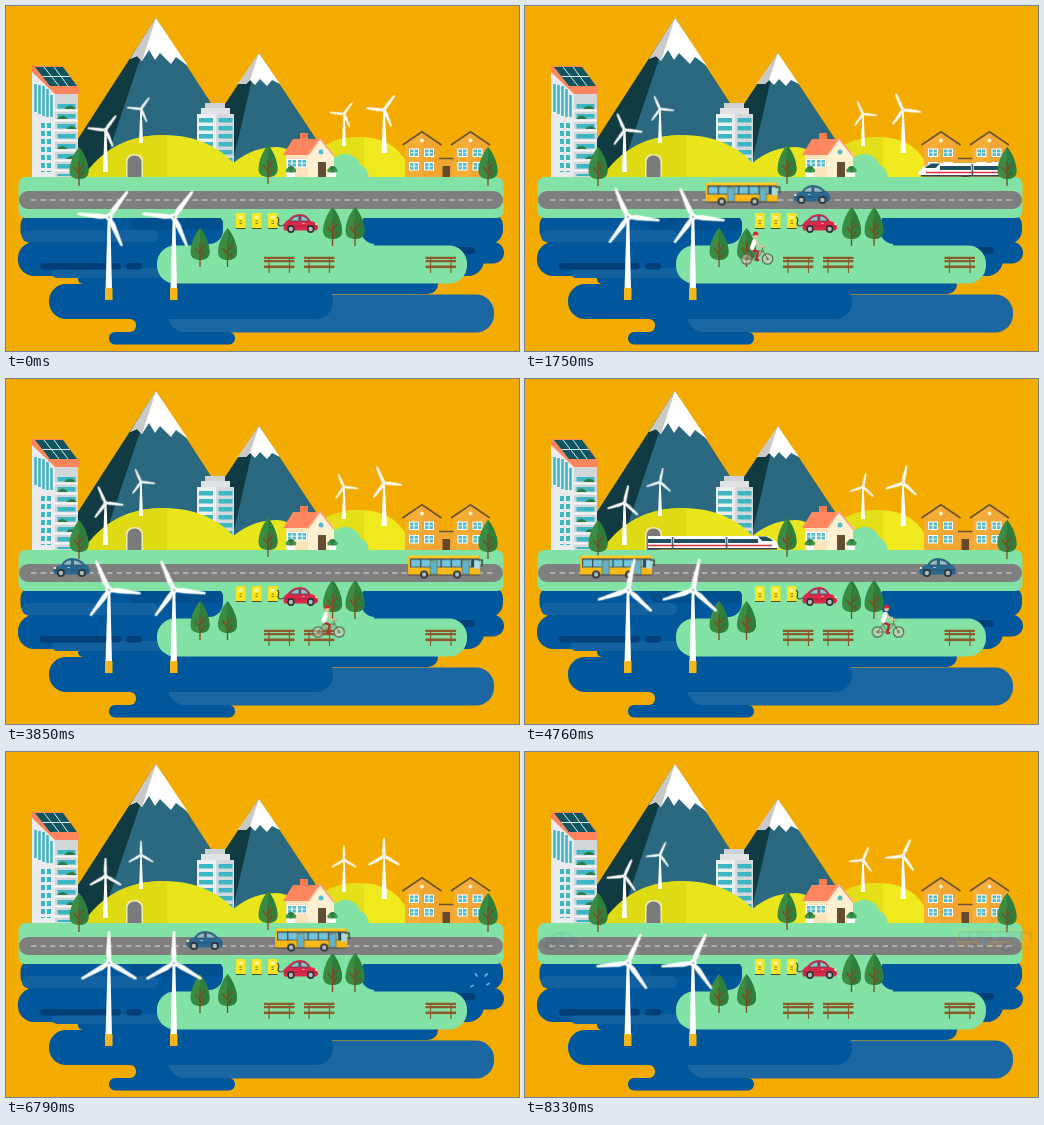
An HTML page without scripts for the animation above (8400 ms loop, 513 px wide and 345 px high).

```html
<!DOCTYPE html>
<html lang="en">
<head>
<meta charset="utf-8">
<title>Green town</title>
<style>
html, body { margin: 0; width: 100%; height: 100%; overflow: hidden; background: #f3ab00; }
svg { display: block; width: 100%; height: 100%; }
.spin { animation: spin 2.1s steps(30) infinite; }
.bus { animation: bus 4.2s steps(60) infinite, fade 4.2s linear infinite; }
.car { animation: car 4.2s steps(60) infinite, fade 4.2s linear infinite; }
.train { animation: train 4.2s steps(60) infinite; }
.rider { animation: ride 8.4s linear infinite; }
.splash { animation: splash 8.4s linear infinite; }
@keyframes spin { from { transform: rotate(36deg); } to { transform: rotate(396deg); } }
@keyframes bus { from { transform: translate(-4px, 175.5px); } to { transform: translate(439px, 175.5px); } }
@keyframes car { from { transform: translate(453px, 179px); } to { transform: translate(10px, 179px); } }
@keyframes train { from { transform: translate(-48px, 156px); } to { transform: translate(1010px, 156px); } }
@keyframes fade { 0%, 98.8%, 100% { opacity: 0; } 4%, 95% { opacity: 1; } }
@keyframes ride {
  0% { transform: translate(158px, 264px) rotate(-12deg); opacity: 0; }
  3% { transform: translate(168px, 261px) rotate(-14deg); opacity: 1; }
  9% { transform: translate(190px, 253px) rotate(-4deg); }
  12% { transform: translate(200px, 253px) rotate(0deg); }
  20.83% { transform: translate(232px, 253px) rotate(0deg); }
  34.17% { transform: translate(279px, 253px) rotate(0deg); }
  56.67% { transform: translate(363px, 253px) rotate(0deg); }
  70.8% { transform: translate(416px, 253px) rotate(0deg); }
  73.33% { transform: translate(428px, 252px) rotate(-27deg); }
  76.67% { transform: translate(449px, 238px) rotate(-12deg); }
  78.5% { transform: translate(462px, 236px) rotate(25deg); opacity: 1; }
  80%, 100% { transform: translate(473px, 243px) rotate(70deg); opacity: 0; }
}
@keyframes splash {
  0%, 79.4% { transform: scale(.3); opacity: 0; }
  80% { transform: scale(.6); opacity: 1; }
  80.83% { transform: scale(1); opacity: 1; }
  85% { transform: scale(1.8); opacity: 1; }
  89%, 100% { transform: scale(2.4); opacity: 0; }
}
</style>
</head>
<body>
<svg viewBox="0 0 513 345" preserveAspectRatio="none">
<defs>
  <path id="blade" d="M-1.2-1L-2.6-9L-1-31Q0-32.5 1-31L2-9L1.4-1Z"/>
  <g id="blades" fill="#fff">
    <use href="#blade"/>
    <use href="#blade" transform="rotate(120)"/>
    <use href="#blade" transform="rotate(240)"/>
    <circle r="3.2"/><circle r="1.4" fill="#b9c6cf" stroke="none"/>
  </g>
  <g id="tree">
    <path d="M0-20C6-13 9.5-3 9.5 4C9.5 10 5 12 0 12C-5 12-9.5 10-9.5 4C-9.5-3-6-13 0-20Z" fill="#3a8c42"/>
    <path d="M0-20C6-13 9.5-3 9.5 4C9.5 10 5 12 0 12Z" fill="#2f7f3c"/>
    <path d="M0-6V19M0 6L-5 0M0 3L5-3M0 10L5 5" fill="none" stroke="#7d4a25" stroke-width="1.3"/>
  </g>
  <g id="bench" stroke="#8b5a2b">
    <path d="M5 1V17M25.5 1V17" stroke-width="1.2"/>
    <path d="M0 1.8H30.5M0 5.2H30.5" stroke-width="2.2"/>
    <path d="M0 10.8H30.5" stroke-width="2.6"/>
  </g>
  <g id="wheel">
    <circle r="4" fill="#2d3438"/><circle r="2.2" fill="#b5bdc1"/>
  </g>
  <g id="auto">
    <path d="M1 14Q1 8 6 6Q11 0 19 0Q26 0 30 7Q37 8 38 14L36 16.5H2Z" fill="currentColor"/>
    <path d="M8 7Q12 2 17.5 1.8V7ZM19.5 1.8Q25 2 28 7H19.5Z" fill="#94bfc9" stroke="#33434c" stroke-width=".7"/>
    <path d="M2 12H37" stroke="#0003"/>
    <path d="M21 9.5H23.5" stroke="#fff9"/>
    <path d="M35 10H37" stroke="#ffe9a0" stroke-width="2"/>
    <use href="#wheel" x="9" y="15"/><use href="#wheel" x="30" y="15"/>
  </g>
  <g id="charger">
    <rect width="9.5" height="16" rx="1" fill="#fbe51d"/>
    <rect x="2.5" y="2.5" width="4.5" height="3" fill="#fff7a0"/>
    <path d="M3.5 8H6M3.5 10.5H6" stroke="#8a7d2c" stroke-width="1.2"/>
    <path d="M0 15.5H9.5" stroke="#4a4632"/>
  </g>
  <g id="pane">
    <rect width="10" height="8.5" fill="#fff"/>
    <path d="M1 1H4.5V7.5H1ZM5.5 1H9V7.5H5.5Z" fill="#55bcc9"/>
    <path d="M0 4.2H10" stroke="#fff" stroke-width=".7"/>
  </g>
  <g id="home">
    <path d="M0 13L17 1L34 13V46H0Z" fill="#f5ad38"/>
    <path d="M17 1L34 13V46H17Z" fill="#f1a633"/>
    <path d="M-2.5 13.5L17 .3L36.5 13.5" fill="none" stroke="#6b5331" stroke-width="1.6"/>
    <circle cx="17" cy="9" r="2" fill="#fff3cf"/>
    <use href="#pane" x="4" y="17"/><use href="#pane" x="19" y="17"/>
    <use href="#pane" x="4" y="30.5"/><use href="#pane" x="19" y="30.5"/>
  </g>
  <g id="pot">
    <circle cy="-4" r="3.6" fill="#2c7b43"/><circle cx="-3" cy="-3" r="2.2" fill="#3f9848"/><circle cx="3" cy="-3" r="2.2" fill="#3f9848"/>
    <path d="M-4-1H4L3 5H-3Z" fill="#fff"/>
  </g>
  <g id="tyre" fill="none">
    <circle r="5.2" fill="#fff6" stroke="#5c6450" stroke-width="1.3"/>
    <path class="spin" d="M-5 0H5M0-5V5M-3.5-3.5L3.5 3.5M-3.5 3.5L3.5-3.5" stroke="#8d8370" stroke-width=".5"/>
    <circle r="1" fill="#a94b3d"/>
  </g>
  <clipPath id="rail"><rect x="123" y="140" width="355" height="40"/></clipPath>
</defs>

<rect width="513" height="345" fill="#f3ab00"/>

<g id="mountains">
  <path d="M150 12L245 159V172H50Z" fill="#2a697f"/>
  <path d="M150 12L50 167V172H94L135 50Z" fill="#113b42"/>
  <path d="M150 12L182 60L170 51L165 58L154 47L149 54L143 44L136 55L131 50L124 53Z" fill="#fff"/>
  <path d="M150 12L136 55L131 50L124 53Z" fill="#c9c9c9"/>
  <path d="M253 47L336 172H170Z" fill="#2a697f"/>
  <path d="M253 47L190 142V160H226L246 73Z" fill="#113b42"/>
  <path d="M253 47L274 78L266 74L261 80L254 73L249 79L244 74L240 78L232 78Z" fill="#fff"/>
  <path d="M253 47L244 74L240 78L232 78Z" fill="#c9c9c9"/>
</g>

<g id="office">
  <path d="M199 97H219V103H199Z" fill="#cfd2d4"/>
  <path d="M195 102H224V109H195Z" fill="#e0e2e4"/>
  <path d="M191 108H228V172H191Z" fill="#eceeef"/>
  <path d="M210 108H228V172H210Z" fill="#d4d8da"/>
  <path d="M200 112V170M219.5 112V170" stroke="#3db5c3" stroke-width="14" stroke-dasharray="4.5 3.5"/>
</g>

<g id="hills">
  <path d="M212 173C228 153 246 141 271 141C286 142 297 151 304 173Z" fill="#e9e51d"/>
  <path d="M76 173C95 143 123 129 157 129C194 129 222 144 240 173Z" fill="#e9e51d"/>
  <path d="M76 173C95 143 123 129 157 129H161V173Z" fill="#dedb14"/>
  <path d="M290 173C303 147 322 131 352 131C376 131 391 139 401 157V173Z" fill="#efe91e"/>
  <path d="M290 173C303 147 322 131 352 131H358V173Z" fill="#e3df18"/>
  <path d="M120 172V156Q120 148 128.5 148Q137 148 137 156V172Z" fill="#efecb4"/>
  <path d="M121.5 172V157Q121.5 149.5 128.5 149.5Q135.5 149.5 135.5 157V172Z" fill="#7a7a7a"/>
  <path d="M314 172V158Q320 148 330 151Q338 145 347 150Q354 154 354 159Q362 161 363 172Z" fill="#82e2a6"/>
</g>

<g id="masts" fill="#fff" stroke="#fff" stroke-width="0">
  <path d="M98.5 124H100.5L102 166H97Z"/><path d="M134.3 103H135.7L137 137H133Z"/>
  <path d="M337.3 108H338.7L340 140H336Z"/><path d="M377.3 104H378.7L381 147H375.5Z"/>
  <g stroke-width="1.3">
    <g transform="translate(99.5 124) scale(.56)"><use href="#blades" class="spin"/></g>
    <g transform="translate(135 103) scale(.44)"><use href="#blades" class="spin"/></g>
    <g transform="translate(338 108) scale(.44)"><use href="#blades" class="spin"/></g>
    <g transform="translate(378 104) scale(.56)"><use href="#blades" class="spin"/></g>
  </g>
</g>

<g id="tower">
  <path d="M26 65L50 87V172H26Z" fill="#e9ebec"/>
  <path d="M49 87H72V172H49Z" fill="#d3d6d8"/>
  <path d="M26 60H57L73 82V88H49L26 66Z" fill="#ff855c"/>
  <path d="M29 61H57L71 80H44Z" fill="#0f5560"/>
  <path d="M38 61L53 80M48 61L62 80M36.5 70.5H64" stroke="#dfeaec"/>
  <path d="M29.5 78V106M33.5 79V108M37.5 80V110M41.5 83V111M45.5 89V111" stroke="#3db5c3" stroke-width="2.5"/>
  <path d="M37 117V166M43 117V166" stroke="#3db5c3" stroke-width="4" stroke-dasharray="5 3"/>
  <path d="M60.5 98V170" stroke="#3db5c3" stroke-width="18" stroke-dasharray="4.5 5.5"/>
  <path d="M49 104.5H72M49 114.5H72M49 124.5H72M49 134.5H72M49 144.5H72M49 154.5H72M49 164.5H72" stroke="#f8f8f8" stroke-width="2"/>
  <path d="M58 103Q64 96 70 103ZM51 113Q57 106 62 113ZM60 123Q66 117 71 123ZM51 143Q56 137 62 143ZM60 153Q65 147 70 153Z" fill="#2c7b43"/>
</g>

<g id="cottage">
  <path d="M280 147H328V172H280Z" fill="#fde3b9"/>
  <path d="M302 149L314 132L328 149V172H302Z" fill="#fff0d2"/>
  <path d="M294 127H302V138H294Z" fill="#f97b52"/>
  <path d="M287 133H314L303 149H277Z" fill="#ff875f"/>
  <path d="M302 149L314 132.5L328 150" fill="none" stroke="#fba27f" stroke-width="1.6"/>
  <use href="#pane" x="281" y="153"/><use href="#pane" x="291" y="153"/>
  <circle cx="315" cy="146" r="2.5" fill="#55bcc9"/>
  <path d="M312 156H320V172H312Z" fill="#644c35"/>
  <use href="#pot" x="285" y="167.5"/><use href="#pot" x="326.5" y="167.5"/>
</g>

<g id="terrace">
  <path d="M432 153H448V172H432Z" fill="#f1a633"/>
  <path d="M432 152.5H448" stroke="#6b5331" stroke-width="1.5"/>
  <path d="M436.5 160H444V172H436.5Z" fill="#65492a"/>
  <use href="#home" x="399" y="125.5"/><use href="#home" x="447.5" y="125.5"/>
</g>

<g id="water" fill="#00579b">
  <rect x="12" y="236" width="466" height="34" rx="16"/>
  <rect x="400" y="236" width="98" height="21.5" rx="10.7"/>
  <rect x="72" y="266" width="300" height="12" rx="5"/>
  <rect x="200" y="262" width="232" height="26" rx="10"/>
  <path d="M118 305H185V330H118Z"/>
  <rect x="162" y="288.5" width="326" height="38" rx="18" fill="#1b67a3"/>
  <rect x="80" y="313" width="50" height="13" rx="6" fill="#f3ab00"/>
  <rect x="43" y="278" width="284" height="35" rx="17"/>
  <rect x="103" y="326" width="126" height="12.5" rx="6"/>
  <rect x="46" y="262" width="130" height="10" rx="5" fill="#1261a0"/>
  <rect x="34" y="257" width="81" height="6.5" rx="3.2" fill="#003f78"/>
  <rect x="120" y="257" width="16" height="6.5" rx="3.2" fill="#003f78"/>
  <rect x="440" y="241" width="29" height="7" rx="3.5" fill="#003f78"/>
  <path d="M200 205H368V246H200Z" fill="#82e2a6"/>
  <rect x="14.5" y="206" width="202.5" height="32" rx="14"/>
  <rect x="355" y="206" width="142" height="32" rx="14"/>
  <rect x="16" y="224" width="136" height="12" rx="6" fill="#1261a0"/>
  <rect x="125" y="211" width="92" height="13" rx="6" fill="#00508f"/>
</g>
<g id="ground" fill="#82e2a6">
  <rect x="151" y="239.5" width="310" height="38" rx="18"/>
  <rect x="12.5" y="171" width="485" height="41" rx="7"/>
  <rect x="13" y="185" width="484" height="18" rx="9" fill="#7f7f7f"/>
  <path d="M25 194H489" stroke="#dedede" stroke-width="1.2" stroke-dasharray="5.5 4"/>
</g>

<g clip-path="url(#rail)">
  <g class="train">
    <path d="M0 11Q5 4 14 1H148Q157 4 162 11L159 14H3Z" fill="#fff"/>
    <path d="M9 4L14 1.5H22L18 6H7ZM153 4L148 1.5H140L144 6H155Z" fill="#1f4f60"/>
    <path d="M22 6H53M56 6H107M110 6H140" stroke="#1f4f60" stroke-width="4"/>
    <path d="M8 10.5H154" stroke="#d93139" stroke-width="1.4"/>
    <path d="M3 13.8H159" stroke="#35414a" stroke-width="1.4"/>
    <path d="M54.5 2V14M108.5 2V14" stroke="#4b5861" stroke-width="1.6"/>
  </g>
</g>

<use href="#tree" x="73" y="161"/><use href="#tree" x="262" y="159"/><use href="#tree" x="482" y="161"/>

<g class="car" color="#2a6a92"><use href="#auto" transform="translate(38) scale(-1 1)"/></g>
<g class="bus">
  <rect y="1" width="72" height="20" rx="2.5" fill="#f9b916"/>
  <path d="M2 2H70" stroke="#ffd029" stroke-width="2"/>
  <path d="M2 4H71V13H2Z" fill="#34444e"/>
  <path d="M3 8.8H64" stroke="#73c5dc" stroke-width="7" stroke-dasharray="9 1.2"/>
  <path d="M66 5.5H71.5V14H66Z" fill="#a5dce8"/>
  <path d="M22 6H29V20H22ZM54 6H61V20H54Z" fill="#5fb3cc" stroke="#8a6a18" stroke-width=".7"/>
  <path d="M0 20.5H72" stroke="#4c4940"/>
  <path d="M70 5.5H74V12" fill="none" stroke="#39424a" stroke-width="1.4"/>
  <g transform="translate(16 20)"><use href="#wheel"/></g>
  <g transform="translate(49 20)"><use href="#wheel"/></g>
</g>

<use href="#charger" x="230" y="207"/><use href="#charger" x="246" y="207"/><use href="#charger" x="262" y="207"/>
<path d="M271 211Q274 212 272 218Q274 222 279 218" fill="none" stroke="#3f4642" stroke-width="1.2"/>
<g transform="translate(276.500 208) scale(.94 1)" color="#d9284a"><use href="#auto"/></g>

<use href="#tree" x="326.500" y="221"/><use href="#tree" x="349" y="221"/>
<use href="#tree" x="194" y="242"/><use href="#tree" x="221.500" y="242"/>
<use href="#bench" x="258" y="250"/><use href="#bench" x="298" y="250"/><use href="#bench" x="419.500" y="250"/>

<g class="rider" fill="none" stroke-linecap="round" stroke-linejoin="round">
  <use href="#tyre" transform="translate(-10.500 0)"/>
  <use href="#tyre" transform="translate(10.500 0)"/>
  <path d="M-10.500 0L-5-8H6L10.500 0M6-8L-1 0L-5-8M-10.500 0H-1M6-8L5-12H8" stroke="#7a6a4c"/>
  <path d="M-5-10L1-7L-1 1H1" stroke="#b52b35" stroke-width="2.500"/>
  <path d="M-5-11L-2.500-18" stroke="#fff" stroke-width="4.500"/>
  <path d="M-1-18L2-13L7-12" stroke="#f2bd95" stroke-width="1.500"/>
  <circle cx="-1.500" cy="-23" r="2.400" fill="#f2bd95"/>
  <path d="M-4.500-23.500Q-4-27.500-1-27.500Q1.500-27 1.500-24Z" fill="#cf2b35"/>
</g>

<g transform="translate(474 238)">
  <path class="splash" d="M-9-3.500L-7-4.500M-4.500-16L-3-14M5-14L7-16M7-5.500L9-6.500" fill="none" stroke="#55bddd" stroke-width="1.800" stroke-linecap="round"/>
</g>

<g id="offshore" fill="#fff">
  <path d="M101.700 211H104.300L106 284H99.500Z"/><path d="M166.700 211H169.300L171 284H164.500Z"/>
  <path d="M99 282H106.500V294H99ZM164 282H171.500V294H164Z" fill="#f6b61a"/>
  <g stroke="#fff" stroke-width=".6">
    <g transform="translate(103 211)"><use href="#blades" class="spin"/></g>
    <g transform="translate(168 211)"><use href="#blades" class="spin"/></g>
  </g>
</g>
</svg>
</body>
</html>
```
